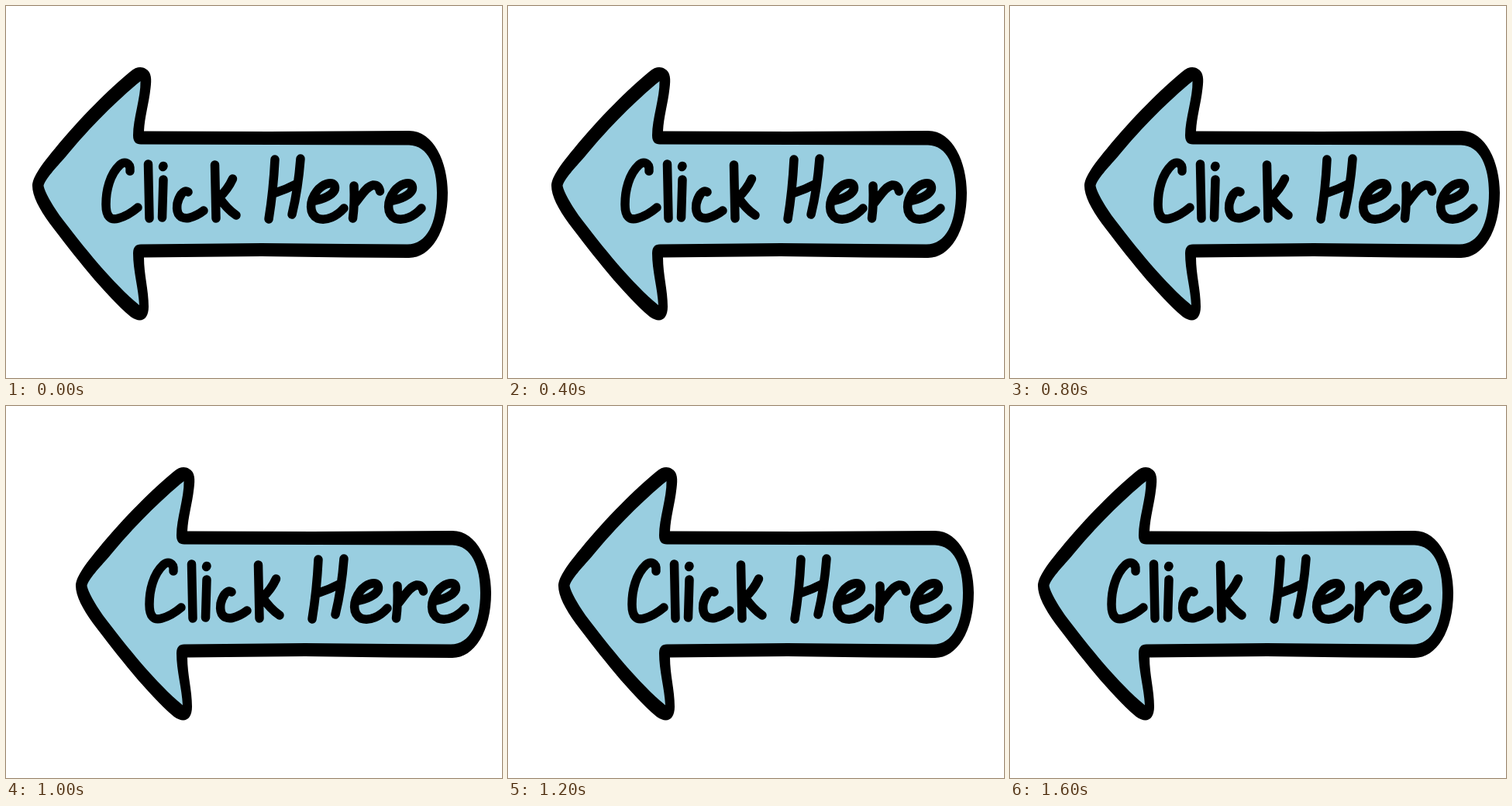
These frames come from a looping animation (640x480 px, 1.7 s). An HTML page with a canvas:

```html
<!DOCTYPE html>
<html lang="en">
<head>
<meta charset="utf-8">
<title>Click Here</title>
<style>
  html, body { margin: 0; width: 100%; height: 100%; overflow: hidden; background: #fff; }
  canvas { display: block; width: 640px; height: 480px; }
</style>
</head>
<body>
<canvas id="stage" width="640" height="480" role="img" aria-label="Click Here"></canvas>
<script>
const ctx = document.getElementById('stage').getContext('2d');
const STEP = 100;

// Rightward slide per step: slow start, sharp turn, slow return.
const slide = [0, 2, 7, 13.5, 22, 31, 41, 52, 62, 63, 56, 43, 31, 22, 13.5, 7, 2];

// The border is uneven, so the black outline and the blue face are separate shapes.
const outline = new Path2D(`
  M34 232 C34 220 49 201 63.5 183.5 C96.5 143.5 132 108 160 85
  C168 78 175 78 180 81 C188 85 188 95 186.5 106 C184 128 179 142 178 161.5
  L340 162 L520 161 C552 161 570 202 570 241 C570 291 548 325 520 325
  L440 324.5 L330 323 L178 324.5 C178 347 184 366 184 388
  C184 405 174 410 161 401 C126 371 88 322 56 280 C43 262 34 245 34 232 Z`);
const face = new Path2D(`
  M48.5 232 C50 224 65 208 76.5 195 C109 155.5 144 121 173.5 97
  C174 118 164 145 164 167 Q164 178.5 174 178.5
  L340 179 L520 179.5 C545 180 556 208 556 241 C556 280 543 307.5 518 307.5
  L440 307 L330 306 L174 307.5 Q164 307.5 164 319
  C164 342 171 364 172 386 C138 358 100 311 69 270 C58 254 50 240 48.5 232 Z`);

const letterE = new Path2D(`
  M400 251 C413 248 427 241 424 232 C421 225 408 230 401 239
  C391 252 391 268 402 274 C414 278 427 271 436 261`);

const lettering = new Path2D([
  'M160 213 C161 202 153 200 147 205 C134 217 129 238 129 256 C129 272 135 277 145 274 C156 271 163 266 170 260', // C
  'M183.5 204 L185 274',                                                             // l
  'M203 206.5 L202.5 207.5 M203 224 L201.5 273',                                     // i
  'M235 240 C228 236 223 247 221 255 C219 270 226 275 236 273.5 C245 271 250 268 255 264', // c
  'M269.5 205 L271 274 M292.5 223 Q286 237 275 247 Q285 262 297 270',                  // k
  'M347 198 Q345 238 339 275 M380 197 Q377 236 369 269 M345 242 Q361 237 376 229',      // H
  'M449 232 Q450 255 447.5 274 M449 256 C458 246 464 233 474 231 Q481 231 482.5 239'   // r
].join(' '));
lettering.addPath(letterE);
lettering.addPath(letterE, new DOMMatrix().translate(100, 0));

function draw(now) {
  const x = slide[Math.floor(now / STEP) % slide.length];
  ctx.fillStyle = '#fff';
  ctx.fillRect(0, 0, 640, 480);
  ctx.save();
  ctx.translate(x, 0);
  ctx.fillStyle = '#000';
  ctx.fill(outline);
  ctx.fillStyle = '#99cee0';
  ctx.fill(face);
  ctx.lineCap = ctx.lineJoin = 'round';
  ctx.lineWidth = 11.5;
  ctx.strokeStyle = '#000';
  ctx.stroke(lettering);
  ctx.restore();
}

const start = performance.now();
function tick() {
  draw(performance.now() - start);
  requestAnimationFrame(tick);
}
tick();
</script>
</body>
</html>
```
